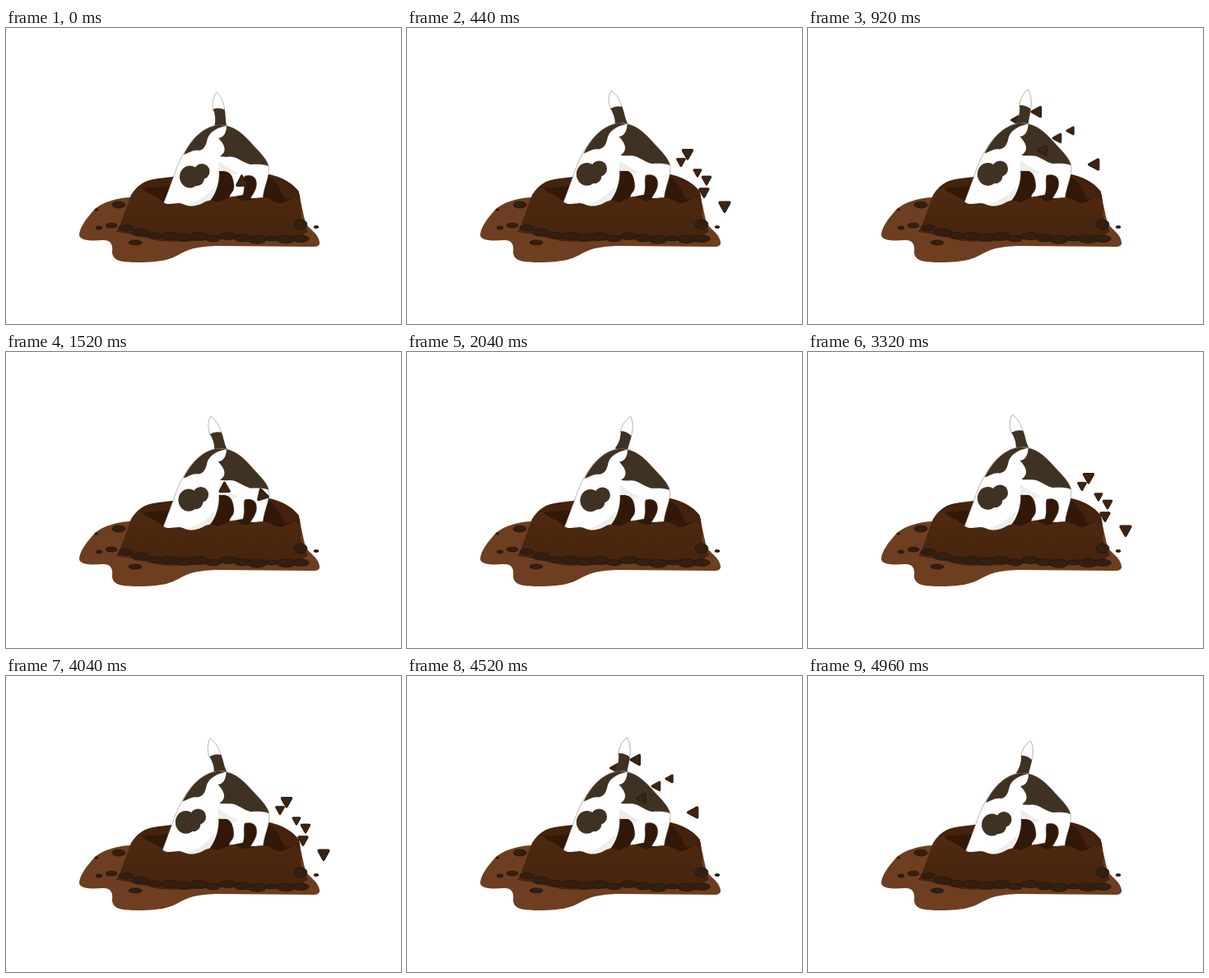
An HTML page for the animation above (5000 ms loop, 480 px wide and 360 px high).

```html
<!DOCTYPE html>
<html lang="en">
<head>
<meta charset="utf-8">
<title>Digging dog</title>
<style>
  html, body { margin: 0; width: 100%; height: 100%; overflow: hidden; background: #fff; }
  svg { display: block; width: 100vw; height: 100vh; }
  .dark { fill: #403223; }
  .hair { fill: #fff; stroke: #5a5148; stroke-width: .4; }
  .shade { fill: #eceeec; }
</style>
</head>
<body>
<svg viewBox="0 0 480 360">
  <defs>
    <linearGradient id="soil" x1="0" y1="0" x2="0" y2="1">
      <stop offset="0" stop-color="#4f2a11"/>
      <stop offset="1" stop-color="#45230d"/>
    </linearGradient>
    <path id="clump" d="M-.8 -6 Q0 -7.4 .9 -6 L6.2 3.6 Q6.6 5 5 5.2 L-5 5.2 Q-6.6 5 -6.1 3.6 Z"
          fill="#3d2412" stroke="#26160a"/>
  </defs>

  <!-- puddle, far rim and hole -->
  <path fill="#6d3e20" d="M150 206 C133 207 118 212 108 220 C98 231 89 243 89 252 C90 259 105 259 118 258
    C128 258 130 264 129 273 C130 284 142 285 162 285 C190 285 201 281 213 274 C226 267 238 266 254 265
    L374 266 Q382 266 381 260 C379 250 370 245 364 238 L357 206 Z"/>
  <path fill="#44220d" d="M152 204 C159 191 168 185 185 183 L210 180 L320 178 C338 182 354 192 357 203 L359 224 L160 222 Z"/>
  <path fill="#321808" d="M163 196 C178 193 190 195 210 190 L255 174 L305 174 C322 182 338 190 353 200
    L355 208 L333 214 L250 216 L190 212 Z"/>
  <path fill="#44220d" d="M320 180 C336 184 349 190 356 199 L356 207 L338 208 C336 200 331 190 320 180 Z"/>

  <g id="back"></g>
  <g id="dog">
    <g id="tail">
      <path class="hair" d="M255 78 C251 83 249 91 251 100 L265 100 C264 91 260 82 255 78 Z"/>
      <path class="dark" d="M251 99 Q258 96 265 99 C267 106 266 113 269 121 L253 121 C255 113 254 106 251 99 Z"/>
    </g>
    <path class="hair" d="M191 214 C196 202 200 190 205 177 C210 162 217 148 227 136 C237 125 248 118 260 118
      C273 117 285 126 298 140 C307 150 318 160 319 168 C321 181 314 190 312 207 L297 207 C301 201 306 194 304 186
      C303 180 296 178 290 180 C288 187 291 193 288 203 L272 206 C271 201 278 200 277 191 C276 182 274 176 267 174
      L259 174 C260 187 255 203 247 211 C238 219 218 220 191 214 Z"/>
    <path class="shade" d="M258 162 C266 166 271 172 283 176 L275 180 C272 175 266 173 259 174 Z"/>
    <path class="shade" d="M220 215 C234 211 246 203 254 192 C253 205 248 211 240 217 Z"/>
    <path class="dark" d="M216 154 C226 134 241 119 260 118 L268 119 C257 121 248 126 245 134
      C243 143 241 148 234 149 C226 148 223 152 216 154 Z"/>
    <path class="dark" d="M268 119 C282 122 291 132 299 141 C308 151 317 159 319 168 C311 165 304 166 297 166
      C286 163 281 156 271 156.5 Q264 157 260 156 C270 150 265 141 258 134 C266 133 268 125 268 119 Z"/>
    <g id="spot" class="dark">
      <ellipse cx="223.5" cy="181" rx="12.5" ry="13.5"/>
      <circle cx="238" cy="174.5" r="9.5"/>
      <circle cx="232" cy="183" r="9"/>
    </g>
  </g>

  <path fill="url(#soil)" d="M152 203 Q158 193 165 195 C172 202 182 203 191 212 C199 217 207 211 215 214
    C224 218 231 217 239 213 C247 208 251 210 257 212 C264 211 269 205 277 205 C284 206 286 212 294 210
    C303 206 312 205 320 208 C327 211 331 215 338 212 C345 208 350 205 356 209 Q360 215 358 224
    C359 235 364 240 367 248 C360 250 358 256 350 258 C330 259 300 257 270 256 C240 259 210 261 187 259
    C170 255 151 250 134 248 C141 238 145 220 152 203 Z"/>
  <g id="stones" fill="#331f12" stroke="#22140a" stroke-width=".7">
    <ellipse cx="137" cy="215" rx="8" ry="4"/>
    <ellipse cx="113" cy="243" rx="4" ry="2"/>
    <ellipse cx="110" cy="221" rx="2" ry="1"/>
    <ellipse cx="157" cy="261" rx="8" ry="3"/>
    <ellipse cx="358" cy="239" rx="8" ry="6"/>
    <ellipse cx="377" cy="242" rx="3" ry="1.6"/>
  </g>
  <g id="front"></g>
</svg>
<script>
const LOOP = 5000, DIG = 720, WAG = 360, STEP = 40, APEX = 200, FALL = 240;
const HOLE = { x: 262, y: 206 };

const $ = id => document.getElementById(id);
const mix = (a, b, u) => a + (b - a) * u;
const clamp = u => Math.max(0, Math.min(1, u));
const wave = (t, peak, period) => Math.cos(2 * Math.PI * (t - peak) / period);

function add(parent, name, attrs) {
  const el = document.createElementNS("http://www.w3.org/2000/svg", name);
  for (const key in attrs) el.setAttribute(key, attrs[key]);
  return parent.appendChild(el);
}

let seed = 7;
const random = () => (seed = seed * 16807 % 2147483647) / 2147483647;

// Stones lie along the foot of the mound
for (let x = 128; x < 365; x += 17.7) {
  const rx = 7 + 5 * random();
  const cy = 238 + 18 * (1 - Math.exp((128 - x) / 40)) + 5 * (random() - .5);
  add($("stones"), "ellipse", { cx: x, cy, rx, ry: rx * .42 });
}

// Each clump has its place at the top of the flight and its drift on the way down
const clumps = [
  { x: 348, y: 166, drift: 38 },
  { x: 278, y: 102, drift: 63 },
  { x: 285, y: 149, drift: 76 },
  { x: 303, y: 134, drift: 61 },
  { x: 252, y: 112, drift: 81, layer: "back" },
  { x: 319, y: 125, drift: 34 }
].map((c, i) => ({
  ...c,
  launch: 100 - 180 * .3 ** i,
  size: 1.12 - .06 * i,
  el: add($(c.layer || "front"), "use", { href: "#clump" })
}));

function fly(c, p) {
  const rise = clamp((p - c.launch) / (APEX - c.launch));
  const fall = Math.max(0, p - APEX) / FALL;
  const x = mix(HOLE.x, c.x, rise) + c.drift * fall;
  const y = mix(HOLE.y, c.y, rise * (2 - rise)) + 51 * fall * fall;
  const spin = -90 * (rise ** 3 + fall);
  c.el.setAttribute("opacity", p < c.launch ? 0 : clamp((560 - p) / 90));
  c.el.setAttribute("transform", `translate(${x} ${y}) rotate(${spin}) scale(${c.size})`);
}

function draw(time) {
  const t = Math.floor(time % LOOP / STEP) * STEP;
  const p = t % DIG;
  const lift = (wave(p, 320, DIG) + .94) / 1.44;

  $("dog").setAttribute("transform",
    `translate(290 208) scale(${1 + .02 * lift} ${1 + .026 * lift}) translate(-290 -208)`);
  $("spot").setAttribute("transform", `translate(${-3.5 * lift} ${-2.4 * lift})`);
  $("tail").setAttribute("transform", `rotate(${7.5 - 16.4 * wave(p, 70, WAG)} 261 119)`);
  clumps.forEach(c => fly(c, p));
}

const start = performance.now();
function tick() {
  draw(performance.now() - start);
  requestAnimationFrame(tick);
}
tick();
</script>
</body>
</html>
```
